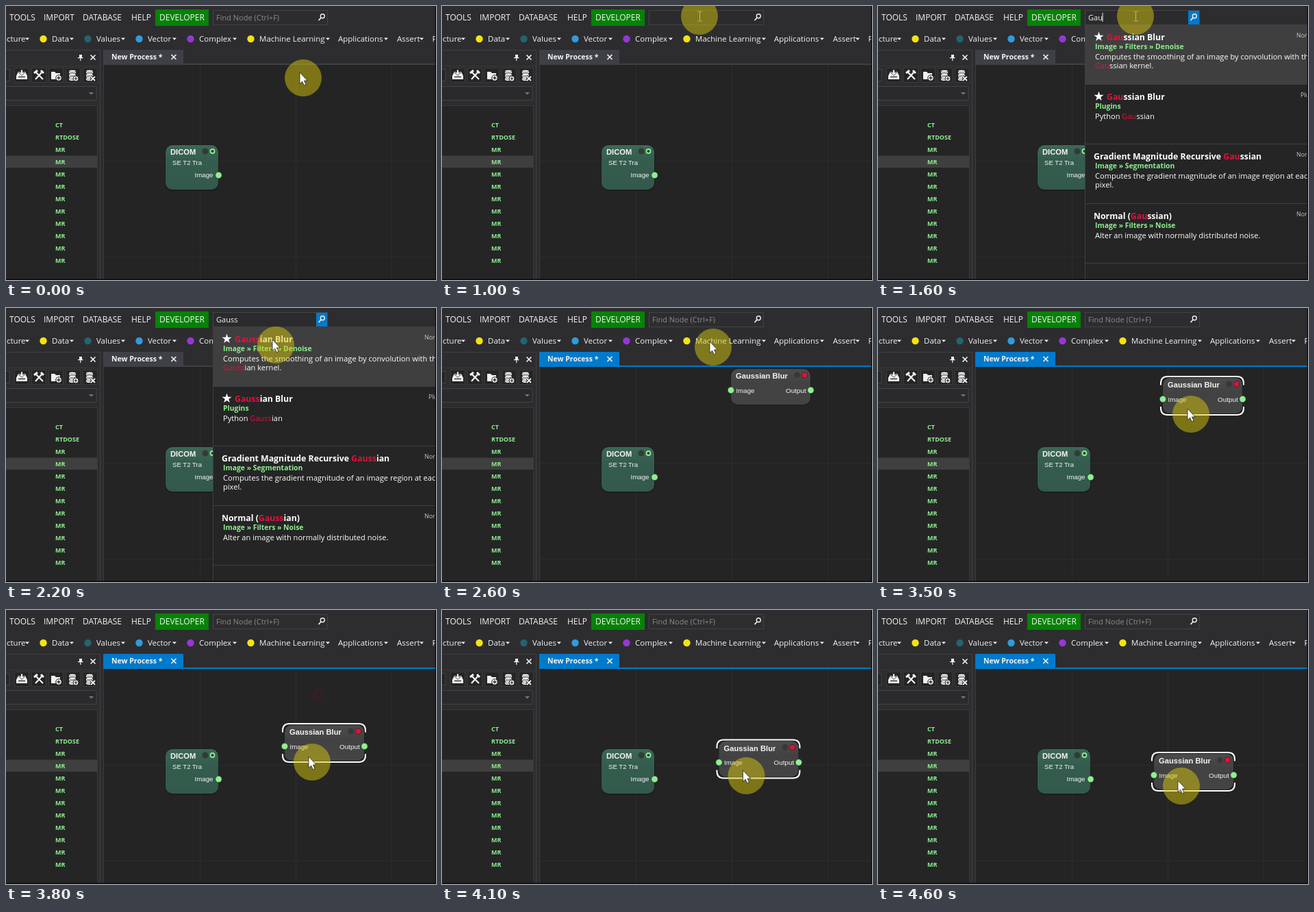
These frames come from a looping animation (628 px wide and 400 px high, 5.1 s). An HTML page:

```html
<!DOCTYPE html>
<html lang="en">
<head>
<meta charset="utf-8">
<title>Node editor</title>
<style>
  html, body { margin: 0; width: 100%; height: 100%; overflow: hidden; background: #2d2d30; }
  svg { display: block; width: 628px; height: 400px; }
  text { font-family: "Open Sans", "Noto Sans", sans-serif; fill: #f4f4f4; white-space: pre; }
  .node text { font-family: "Liberation Sans", Arial, sans-serif; }
  #popup text { fill: #fff; }
  #popup .green, .green { fill: #90ee90; }
  #popup .dim, .dim { fill: #8a8a8a; }
  #popup .tag { fill: #c8c8c8; }
  .bold { font-weight: 700; }
  .hit { fill: #dc143c; }
</style>
</head>
<body>
<svg viewBox="0 0 628 400">
  <defs>
    <linearGradient id="teal" x2="0" y2="1">
      <stop offset="0" stop-color="#3d6757"/><stop offset=".35" stop-color="#345d4e"/><stop offset="1" stop-color="#33594b"/>
    </linearGradient>
    <linearGradient id="grey" x2="0" y2="1">
      <stop offset="0" stop-color="#4c4c4c"/><stop offset=".4" stop-color="#424242"/><stop offset="1" stop-color="#444"/>
    </linearGradient>
    <clipPath id="canvas"><rect x="143" y="86" width="485" height="314"/></clipPath>
  </defs>
  <g id="base"></g>
  <g id="tab"></g>
  <g id="nodes" clip-path="url(#canvas)"></g>
  <g id="search"></g>
  <g id="popup"></g>
  <path d="M627.5 0V400M0 399.3H628" stroke="#0a0a0a" stroke-width="1.4"/>
  <g id="cursor">
    <circle r="27" fill="#d8c80c" fill-opacity=".49"/>
    <path id="arrow" d="M-5-8V8.5L-1.3 5.2 1.3 10.8 4 9.6 1.5 4H6.3Z" fill="#fff" stroke="#222" stroke-width=".8"/>
    <path id="beam" d="M-2.5-7H-.5L.5-6 1.5-7H3.5M.5-6V6M-2.5 7H-.5L.5 6 1.5 7H3.5" fill="none" stroke="#bcb896"/>
  </g>
</svg>
<script>
const LOOP = 5100, STEP = 100, QUERY = "Gauss";
const $ = id => document.getElementById(id);

const text = (x, y, s, size, cls = "") => `<text x="${x}" y="${y}" font-size="${size}" class="${cls}">${s}</text>`;
const rect = (x, y, w, h, fill, more = "") => `<rect x="${x}" y="${y}" width="${w}" height="${h}" fill="${fill}" ${more}/>`;
const dot = (x, y, r, fill, more = "") => `<circle cx="${x}" cy="${y}" r="${r}" fill="${fill}" ${more}/>`;
const line = (d, stroke, w = 1) => `<path d="${d}" fill="none" stroke="${stroke}" stroke-width="${w}"/>`;
const cross = (x, y) => line(`M${x - 3.5} ${y - 3.5}l7 7m0-7l-7 7`, "#f1f1f1", 1.7);

// [time, x, y], joined by straight segments
const POINTER = [
  [0, 434, 105], [100, 428, 94], [200, 414, 72], [300, 396, 45], [400, 383, 25], [500, 377, 16], [600, 376, 15],
  [2000, 376, 15], [2100, 386, 36], [2200, 394, 54], [2300, 396, 57], [2600, 396, 57], [3000, 405, 80],
  [3100, 423, 96], [3200, 447, 119], [3300, 461, 132], [3400, 461, 133], [3500, 457, 155], [3600, 451, 186],
  [3700, 449, 208], [3800, 447, 222], [4000, 445, 238], [4200, 444, 246], [4600, 443, 257]
];
const BLUR = [
  [3400, 422, 120], [3500, 416, 133], [3600, 411, 155], [3700, 409, 180], [3800, 407, 199],
  [4000, 405, 218], [4200, 404, 227], [4600, 403, 241]
];
const TYPED = [[1300, 1], [1500, 2], [1600, 3], [1900, 4], [2000, 5]];

function along(path, t) {
  const i = path.findIndex(p => p[0] > t);
  if (i === 0) return path[0].slice(1);
  if (i < 0) return path[path.length - 1].slice(1);
  const [t0, x0, y0] = path[i - 1], [t1, x1, y1] = path[i];
  const k = (t - t0) / (t1 - t0);
  return [x0 + (x1 - x0) * k, y0 + (y1 - y0) * k];
}

function menuBar() {
  const items = [[5, "TOOLS"], [55, "IMPORT"], [112, "DATABASE"], [183, "HELP"]];
  return items.map(([x, s]) => text(x, 21, s, 12)).join("") +
    rect(218, 5, 78, 24, "#068206") + text(224, 21, "DEVELOPER", 12);
}

function categories() {
  const items = [
    [-6, "ucture", 31], [67, "Data", 96, "#f5e211"], [132, "Values", 171, "#22656f"],
    [207, "Vector", 246, "#2f9be0"], [282, "Complex", 334, "#9736d6"],
    [370, "Machine Learning", 470, "#f5e211"], [485, "Applications", 555], [571, "Assert", 607], [622.5, "P", 640]
  ];
  return items.map(([x, s, drop, color]) =>
    (color ? dot(x - 12.5, 48, 5.2, color) : "") + text(x, 52, s, 11.5) +
    `<path d="M${drop - 3} 46.5h6l-3 3.3z" fill="#f1f1f1"/>`).join("");
}

function toolIcons() {
  const white = "#f1f1f1";
  const disks = x => [96, 101, 106].map(y =>
    `<path d="M${x - 6} ${y - 1}v2a5 2 0 0 0 10 0v-2z" fill="${white}"/><ellipse cx="${x - 1}" cy="${y - 1}" rx="5" ry="1.8" fill="${white}" stroke="#252526" stroke-width=".6"/>`).join("");
  return [23, 48, 73, 98, 123].map(x => rect(x - 10.5, 90.5, 21, 21, "#252526", 'stroke="#3a3a3d"')).join("") +
    rect(-5, 92.5, 10, 17, "#252526", 'stroke="#434346"') +
    `<path d="M15 102l3-6h10l3 6v5H15z" fill="${white}"/>` +
    `<path d="M21.5 93h3v4h3l-4.5 4.5-4.5-4.5h3z" fill="${white}" stroke="#252526" stroke-width=".8"/>` +
    line("M18 103.5h10", "#252526", 1.3) +
    line("M43 96l11 11M53 96l-10 11", white, 2.2) + line("M41 98l5-4M51 94l4 4", white, 3) +
    `<path d="M66 96h5l2 2h6v9H66z" fill="${white}"/>` +
    dot(77, 105, 4.3, white, 'stroke="#252526"') + line("M74.5 105h5M77 102.5v5", "#252526", 1.3) +
    disks(98) + dot(102, 106, 4, white, 'stroke="#252526"') + line("M99.8 106h4.4M102 103.8v4.4", "#252526", 1.2) +
    disks(123) + line("M124 103l6 6m0-6l-6 6", "#252526", 4) + line("M124 103l6 6m0-6l-6 6", white, 1.8);
}

function sidePanel() {
  const kinds = ["CT", "RTDOSE", ...Array(10).fill("MR")];
  return line("M0 64.5H137.5V400", "#3f3f46") +
    `<path d="M107 71h4v4h1.500v1.300h-7.500v-1.300h2z" fill="#f1f1f1"/>` + line("M108.8 76v4", "#f1f1f1", 1.2) +
    cross(127, 75) + line("M0 87.5H137", "#38383b") + toolIcons() +
    rect(-2, 117.5, 134, 20, "#2a2a2c", 'stroke="#434346"') +
    `<path d="M121 126h7l-3.5 3.5z" fill="#777"/>` +
    rect(-2, 145.5, 135.5, 260, "#252526", 'stroke="#3a3a3e"') + rect(0, 218.5, 133, 17.5, "#3f3f3f") +
    kinds.map((s, i) => text(72, 177 + 18 * i, s, 9, "green bold")).join("");
}

function grid() {
  return rect(143, 85, 485, 315, "#242424") +
    line("M283.5 86V400M423.5 86V400M563.5 86V400M143 226.5H628M143 366.5H628", "#2d2d2d") +
    line("M142.5 64V400", "#3a3a3e");
}

const port = (x, y) => dot(x, y, 4.7, "#90ee90", 'stroke="#2a3a2a" stroke-width=".6"');

function dicomNode() {
  return `<g class="node">` + rect(232, 202, 79, 68, "#1d1d1d", 'rx="11"') +
    rect(233, 203, 77, 65, "url(#teal)", 'rx="10"') +
    text(240, 217, "DICOM", 11.2, "bold") + dot(291, 212, 4.6, "#333b37") +
    dot(301.5, 212, 3, "#23392f", 'stroke="#90ee90" stroke-width="1.8"') +
    text(243, 232, "SE T2 Tra", 9.6) + text(275.5, 250, "Image", 9.7) + port(310.5, 247) + `</g>`;
}

// Local origin is the input port
function blurNode(selected) {
  const frame = "M-3-20.5V-23Q-3-33 7-33H108Q118-33 118-23V-20.5M-3 11V13Q-3 23 7 23H108Q118 23 118 13V11";
  return `<g class="node">` + rect(-1, -32, 118, 54, "#1d1d1d", 'rx="11"') +
    rect(0, -31, 116, 52, "url(#grey)", 'rx="10"') +
    (selected ? line(frame, "#fff", 2) : "") +
    text(7, -17, "Gaussian Blur", 11.2, "bold") + dot(96.5, -22, 4.4, "#383838") +
    dot(107.5, -22, 4.2, "#dc143c", 'stroke="#3a1c24" stroke-width=".8"') +
    text(7.5, 3.5, "Image", 9.7) + text(80, 3.5, "Output", 9.9) + port(0, 0) + port(116.5, 0) + `</g>`;
}

function tab(active) {
  const fill = active ? "#007acc" : "#3f3f46";
  return rect(142, 64, 117, 21, fill) + rect(142, 84, 486, 2, fill) +
    text(154, 78, "New Process *", 10.5, "bold") + cross(245, 74.5);
}

function searchBox(focused, typed, caret, open) {
  const end = 307 + [0, 8, 14, 20.5, 26, 31.5][typed.length];
  return rect(302.5, 6.5, 167, 21, focused ? "#2b2b2d" : "#2d2d30", 'stroke="#434346"') +
    (open ? rect(453, 7, 16, 20, "#007acc") : "") +
    line("M456.5 21l3.7-4", "#f1f1f1", 1.8) + dot(462.3, 14.8, 3, "none", 'stroke="#f1f1f1" stroke-width="1.4"') +
    (focused ? text(307, 21, typed, 11) : text(307, 21, "Find Node (Ctrl+F)", 11, "dim")) +
    (caret ? line(`M${end + .5} 10V23`, "#f1f1f1") : "");
}

function star(x, y) {
  const pts = Array.from({ length: 10 }, (_, i) => {
    const a = i * Math.PI / 5, r = i % 2 ? 2.9 : 7.4;
    return `${x + r * Math.sin(a)},${y - r * Math.cos(a)}`;
  });
  return `<polygon points="${pts.join(" ")}" fill="#fff"/>`;
}

const RESULTS = [
  { star: true, title: "Gaussian Blur", path: "Image » Filters » Denoise", tag: "Normal",
    info: ["Computes the smoothing of an image by convolution with the", "Gaussian kernel."] },
  { star: true, title: "Gaussian Blur", path: "Plugins", tag: "Plugin", info: ["Python Gaussian"] },
  { title: "Gradient Magnitude Recursive Gaussian", path: "Image » Segmentation", tag: "Normal",
    info: ["Computes the gradient magnitude of an image region at each", "pixel."] },
  { title: "Normal (Gaussian)", path: "Image » Filters » Noise", tag: "Normal",
    info: ["Alter an image with normally distributed noise."] }
];

function results(typed) {
  const mark = s => s.replace(typed, `<tspan class="hit">${typed}</tspan>`);
  const rows = RESULTS.map((r, i) => {
    const y = 27 + 87 * i;
    return (r.star ? star(322.5, y + 18) : "") +
      text(r.star ? 334 : 315, y + 23, mark(r.title), 12.3, "bold") +
      text(317, y + 36, r.path, 10.4, "green bold") +
      r.info.map((s, k) => text(317, y + 51 + 13 * k, mark(s), 11.08)).join("") +
      text(r.tag === "Normal" ? 611 : 617, y + 19, r.tag, 8.9, "tag") +
      line(`M303 ${y + 87.5}H628`, "#3f3f46");
  });
  return rect(302.5, 27.5, 330, 380, "#252526", 'stroke="#3f3f46"') +
    rect(303, 28, 325, 86, "#3f3f3f") + rows.join("");
}

function draw(t) {
  const [x, y] = along(POINTER, t), [bx, by] = along(BLUR, t);
  const count = TYPED.reduce((n, [at, c]) => t >= at ? c : n, 0);
  const typed = QUERY.slice(0, count);
  const added = t >= 2500, open = t >= 1500 && !added, focused = t >= 500 && !added;
  const caret = focused && (t < 1000 || (t >= 1500 && t < 1900));
  const ring = t >= 3400 && t < 3900;

  $("tab").innerHTML = tab(added);
  $("nodes").innerHTML = dicomNode() +
    (ring ? `<ellipse cx="456" cy="123.5" rx="5.5" ry="6.5" fill="none" stroke="#5c1820" stroke-width="1.2"/>` : "") +
    (added ? `<g transform="translate(${bx} ${by})">${blurNode(t >= 3400)}</g>` : "");
  $("search").innerHTML = searchBox(focused, typed, caret, open);
  $("popup").innerHTML = open ? results(typed) : "";
  $("cursor").setAttribute("transform", `translate(${x} ${y})`);
  $("beam").style.display = y < 28 ? "" : "none";
  $("arrow").style.display = y < 28 ? "none" : "";
}

$("base").innerHTML = rect(0, 0, 628, 400, "#2d2d30") + menuBar() + categories() + sidePanel() + grid();

let shown = -1;
const start = performance.now();
function tick() {
  const t = Math.floor((performance.now() - start) % LOOP / STEP) * STEP;
  if (t !== shown) draw(shown = t);
  requestAnimationFrame(tick);
}
tick();
</script>
</body>
</html>
```
